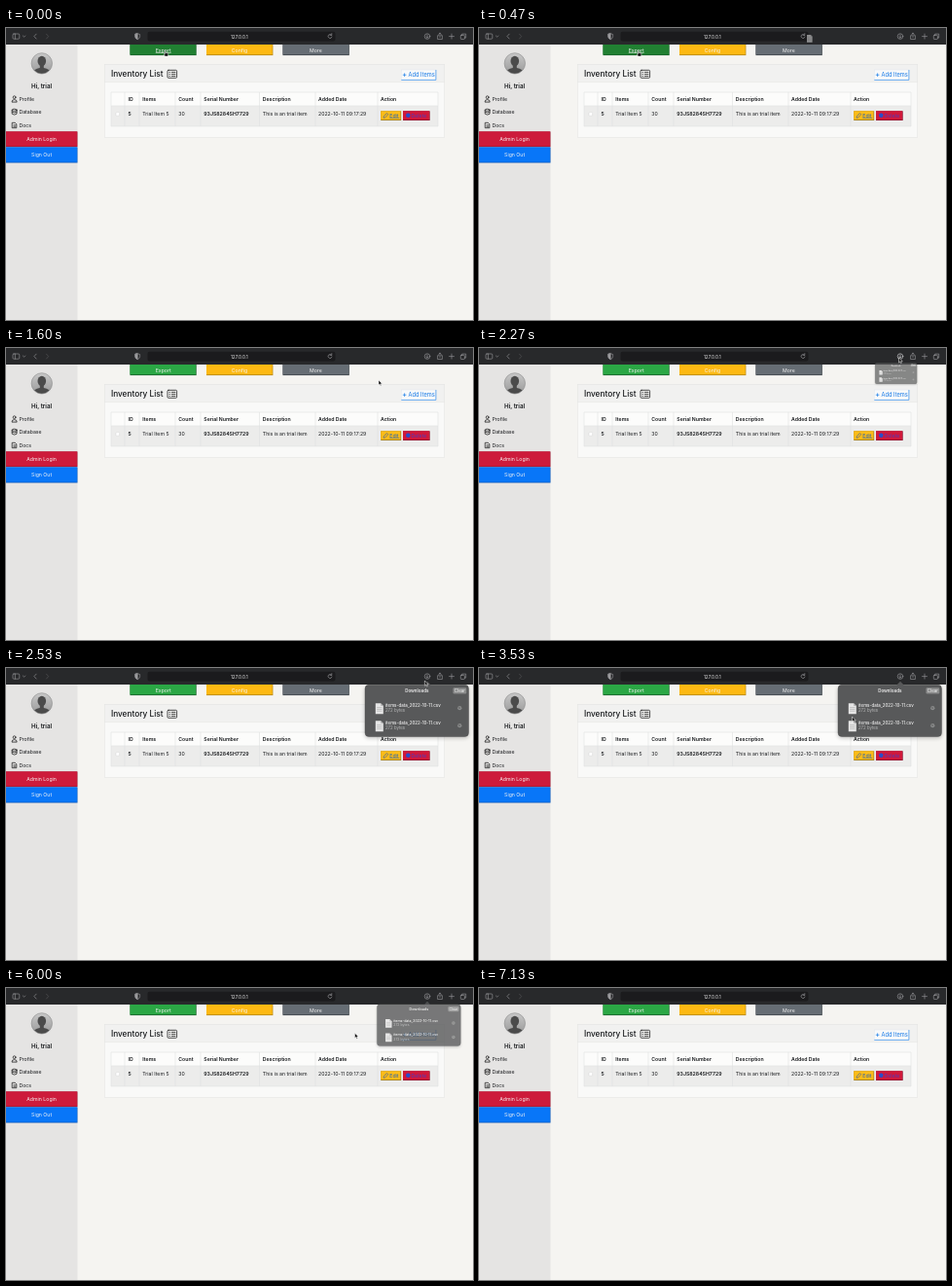
These frames come from a looping animation (480 by 300 pixels, 7190 ms). An HTML page:

```html
<!DOCTYPE html>
<html lang="en">
<head>
<meta charset="utf-8">
<title>Inventory List</title>
<style>
  html, body { margin: 0; width: 100%; height: 100%; overflow: hidden; background: #f5f4f1; }
  svg { display: block; width: 480px; height: 300px; }
  text { font: 5.2px Inter, "Open Sans", sans-serif; fill: #17191c; }
  .b { font-weight: 600; }
  .mid { text-anchor: middle; }
  .light { fill: #f4f4f4; }
  .ico { fill: none; stroke: #222; stroke-width: .8; stroke-linecap: round; stroke-linejoin: round; }
  .bar { fill: none; stroke: #9c9c9f; stroke-width: .6; stroke-linecap: round; stroke-linejoin: round; }
  .grid { fill: none; stroke: #e0e1e1; stroke-width: .6; }
</style>
</head>
<body>
<svg viewBox="0 0 480 300" xmlns="http://www.w3.org/2000/svg">
  <defs>
    <linearGradient id="grey" x2="0" y2="1">
      <stop stop-color="#c9c9c9"/><stop offset="1" stop-color="#999"/>
    </linearGradient>
    <clipPath id="round"><circle cx="36.8" cy="36.4" r="10.3"/></clipPath>
    <filter id="soft" x="-20%" y="-20%" width="140%" height="150%"><feGaussianBlur stdDeviation="2"/></filter>
    <g id="doc">
      <path d="M0 0H5.3L8 2.8V11H0Z" fill="#e6e6e6"/>
      <path d="M5.3 0V2.8H8Z" fill="#b5b5b5"/>
      <path d="M1.4 4.4H6.6M1.4 6.2H6.6M1.4 8H6.6" stroke="#aaa" stroke-width=".6"/>
    </g>
  </defs>

  <rect width="480" height="300" fill="#f5f4f1"/>
  <rect width="73.5" height="300" fill="#e5e4e3"/>

  <!-- sidebar -->
  <circle cx="36.8" cy="36.4" r="10.7" fill="url(#grey)" stroke="#8c8c8c" stroke-width=".6"/>
  <g clip-path="url(#round)" fill="#4b4b4b">
    <ellipse cx="36.8" cy="34" rx="4.3" ry="5.3"/>
    <path d="M34.8 37H38.8V41Q46 42 46.5 48H27Q27.6 42 34.8 41Z"/>
  </g>
  <text class="b mid" x="36.6" y="61.8" style="font-size:6.2px">Hi, trial</text>
  <g class="ico">
    <circle cx="8.6" cy="71.2" r="1.4"/>
    <path d="M6 75.7Q6 73.6 8.6 73.6T11.2 75.7Z"/>
    <ellipse cx="8.6" cy="84.2" rx="2.4" ry="1"/>
    <path d="M6.2 84.2V88.2Q8.6 90 11 88.2V84.2M6.2 86.2Q8.6 88 11 86.2"/>
    <path d="M6.6 97.3H9.3L10.8 98.8V102.7H6.6ZM7.9 99.8H9.5M7.9 101.3H9.5"/>
  </g>
  <text x="13.4" y="74.8">Profile</text>
  <text x="13.4" y="88.2">Database</text>
  <text x="13.4" y="102">Docs</text>
  <rect y="106.4" width="73.5" height="15.8" fill="#9f1730"/>
  <rect y="106.4" width="72.9" height="15" fill="#cd1b3b"/>
  <rect y="122.5" width="73.5" height="16" fill="#0759bd"/>
  <rect y="122.5" width="72.9" height="15.2" fill="#0876f8"/>
  <text class="mid light" x="36.6" y="116.1">Admin Login</text>
  <text class="mid light" x="36.6" y="132.4">Sign Out</text>

  <!-- top buttons -->
  <rect x="127.5" y="15" width="68.2" height="13.1" fill="#186429"/>
  <rect id="export" x="127.5" y="15" width="67.5" height="12.2"/>
  <rect x="206" y="15" width="68.4" height="13.1" fill="#b88912"/>
  <rect x="206" y="15" width="67.7" height="12.2" fill="#fdb913"/>
  <rect x="284.5" y="15" width="68.3" height="13.1" fill="#41474d"/>
  <rect x="284.5" y="15" width="67.6" height="12.2" fill="#666d74"/>
  <text class="mid light" x="161.7" y="24.6">Export</text>
  <path id="exportLine" d="M153.8 25.5H169.6" stroke="#f4f4f4" stroke-width=".5"/>
  <text class="mid light" x="240" y="24.6">Config</text>
  <text class="mid light" x="318.4" y="24.6">More</text>

  <!-- card -->
  <rect x="101.3" y="37.3" width="349.4" height="75" fill="#f9f9f8" stroke="#e6e6e5" stroke-width=".6"/>
  <rect x="101.3" y="37.3" width="349.4" height="18.5" fill="#f1f1f0" stroke="#e6e6e5" stroke-width=".6"/>
  <text x="107.9" y="49.7" style="font-size:8.3px;font-weight:500">Inventory List</text>
  <g class="ico">
    <rect x="166" y="43.3" width="9.6" height="8" rx="1"/>
    <path d="M170.3 45.4H174M170.3 47.4H174M170.3 49.4H174M168 45.4H168.5M168 47.4H168.5M168 49.4H168.5"/>
  </g>
  <rect x="406.3" y="43" width="35.6" height="10.4" fill="#f8f9fa" stroke="#dce3ea" stroke-width=".4"/>
  <path d="M406.3 53.4H441.9V43" fill="none" stroke="#4a9bf0" stroke-width=".8"/>
  <path d="M407.8 48.2H411.4M409.6 46.4V50" stroke="#1479e6" stroke-width=".7"/>
  <text x="413.6" y="50.1" style="font-size:5.7px;fill:#1479e6">Add Items</text>

  <rect x="108" y="66" width="336" height="14" fill="#fcfcfb"/>
  <rect x="108" y="80" width="336" height="21" fill="#ececeb"/>
  <path class="grid" d="M108 66H444V101H108ZM108 80H444M122 66V101M137 66V101M174 66V101M200 66V101M260.5 66V101M318 66V101M382 66V101"/>
  <rect x="113" y="86.6" width="3.6" height="3.6" rx=".7" fill="#fff" stroke="#ccc" stroke-width=".4"/>
  <g id="cells"></g>

  <rect x="385.2" y="85.3" width="21" height="9.7" fill="#9a7b25"/>
  <rect x="385.2" y="85.3" width="20.3" height="8.9" fill="#fbbb18"/>
  <path d="M388 92.3L388.4 90.6L391.5 87.5L392.8 88.8L389.7 91.9Z" fill="none" stroke="#47669a" stroke-width=".7"/>
  <text x="394.3" y="91.7" style="fill:#1f62b8">Edit</text>
  <path id="editLine" d="M394.3 92.6H404.3" stroke="#1f62b8" stroke-width=".5"/>
  <rect x="408" y="85.3" width="27.7" height="9.7" fill="#8d1631"/>
  <rect x="408" y="85.3" width="27" height="8.9" fill="#cf183b"/>
  <circle cx="413.3" cy="89.8" r="2.3" fill="#274dca"/>
  <text x="416.6" y="91.7" style="fill:#513bbb">Delete</text>

  <!-- browser bar -->
  <rect width="480" height="17" fill="#28292b"/>
  <rect x="145.5" y="3.8" width="193" height="9.8" rx="2" fill="#1b1b1d"/>
  <text class="mid" x="239.8" y="10.5" style="fill:#eee;font-size:4.7px">127.0.0.1</text>
  <g class="bar">
    <rect x="7" y="6" width="6.8" height="5.2" rx="1"/>
    <path d="M9.4 6V11.2M17.4 8L18.6 9.2L19.8 8M31.1 6.2L28.9 8.6L31.1 11"/>
    <path d="M41.5 6.2L43.7 8.6L41.5 11" stroke="#5a5a5c"/>
    <path d="M135.2 5.8L137.6 6.5V8.7Q137.6 10.8 135.2 11.7Q132.8 10.8 132.8 8.7V6.5Z"/>
    <path d="M135.2 5.8V11.7Q132.8 10.8 132.8 8.7V6.5Z" fill="#9c9c9f"/>
    <path d="M334.6 7.2A2 2 0 1 0 335 9M334.8 5.6V7.4H333"/>
    <g id="load">
      <circle cx="433" cy="8.6" r="2.8"/>
      <path d="M433 7V10M431.8 9L433 10.2L434.2 9"/>
    </g>
    <path d="M444.8 7.7H443.6V11.5H448.4V7.7H447.2M446 9.6V5.2M444.8 6.3L446 5.1L447.2 6.3"/>
    <path d="M458 6.1V11.1M455.5 8.6H460.5M468.7 7.4V6.1H472.7V10.1H471.4"/>
    <rect x="467.3" y="7.4" width="4.1" height="4.1" rx=".7"/>
  </g>

  <!-- downloads list -->
  <g id="pop">
    <rect x="369" y="19" width="106.5" height="53" rx="4" fill="#000" opacity=".25" filter="url(#soft)"/>
    <path d="M373 17.3H429.5L433 13.8L436.5 17.3H471.5Q475.5 17.3 475.5 21.3V66.5Q475.5 70.5 471.5 70.5H373Q369 70.5 369 66.5V21.3Q369 17.3 373 17.3Z" fill="#58595a" stroke="#474848" stroke-width=".4"/>
    <text class="mid b" x="422.3" y="25.2" style="fill:#eee;font-size:4.5px">Downloads</text>
    <rect x="459.5" y="20.3" width="13.8" height="6.3" rx="1.3" fill="#8b8c8c"/>
    <text class="mid" x="466.4" y="25.1" style="fill:#f2f2f2;font-size:4.5px">Clear</text>
    <g id="files"></g>
  </g>

  <use id="fly" href="#doc"/>
  <g id="cursor" stroke="#fff" stroke-width=".5" stroke-linejoin="round" fill="#111">
    <path id="arrow" d="M0 0V5.2L1.2 4.1L2 5.9L2.9 5.5L2.1 3.8H3.7Z"/>
    <path id="hand" d="M-.5 0Q0 -.7 .5 0V2L2.6 2.5Q3.2 2.8 3 3.6L2.6 5.6H-.4L-1.7 3.5Q-1.4 2.7 -.5 3.4Z"/>
  </g>
</svg>
<script>
const LOOP = 7190;
const el = id => document.getElementById(id);
const label = (x, y, s, cls = '', style = '') =>
  `<text x="${x}" y="${y}" class="${cls}" style="${style}">${s}</text>`;

// x, heading, value, bold value
const columns = [
  [125.5, 'ID', '5', true],
  [140.3, 'Items', 'Trial Item 5'],
  [177.3, 'Count', '30'],
  [203.3, 'Serial Number', '93JS8284SH7729', true],
  [263.8, 'Description', 'This is an trial item'],
  [321, 'Added Date', '2022-10-11 09:17:29'],
  [385, 'Action', '']
];
el('cells').innerHTML = columns.map(([x, head, value, bold]) =>
  label(x, 75.2, head, 'b') + label(x, 90.3, value, bold ? 'b' : '')).join('');

el('files').innerHTML = [36.2, 54.2].map(y => `
  <use href="#doc" x="379.8" y="${y}"/>
  ${label(390, y + 3.6, 'items-data_2022-10-11.csv', '', 'fill:#f0f0f0;font-size:4.4px;font-weight:500')}
  ${label(390, y + 9, '272 bytes', '', 'fill:#b9baba;font-size:4.3px')}
  <circle cx="466.3" cy="${y + 5}" r="2.1" fill="#8b8c8c"/>
  <circle cx="466" cy="${y + 4.7}" r=".8" fill="none" stroke="#555" stroke-width=".4"/>
  <path d="M466.6 ${y + 5.3}l.7 .7" stroke="#555" stroke-width=".4"/>`).join('');

// time followed by values
const path = [
  [0, 163.8, 23.5], [730, 164, 23.5], [930, 164, 23.5], [1000, 171.8, 23.8],
  [1200, 366, 41], [1400, 366, 41], [2000, 431.5, 9.8], [2400, 431.5, 9.8],
  [2930, 424, 31], [3270, 404, 62], [3530, 383.5, 50], [3730, 383.5, 50],
  [4400, 408, 37], [4700, 408, 37], [5200, 359.3, 46], [5270, 358.5, 46.3]
];
const popKeys = [
  [2270, .405, .7], [2330, .8, .9], [2400, 1.03, 1], [2470, 1, 1],
  [5930, 1, 1], [6000, .807, .8], [6070, .45, .35], [6130, .4, 0]
];

function at(keys, t) {
  const i = keys.findIndex(k => k[0] > t);
  if (i < 0) return keys[keys.length - 1].slice(1);
  if (i === 0) return keys[0].slice(1);
  const a = keys[i - 1], b = keys[i];
  const u = (t - a[0]) / (b[0] - a[0]);
  const e = b[0] - a[0] > 150 ? u * u * (3 - 2 * u) : u;
  return a.slice(1).map((v, j) => v + (b[j + 1] - v) * e);
}

const show = (id, on) => el(id).setAttribute('visibility', on ? 'visible' : 'hidden');

function draw(ms) {
  const step = Math.floor((ms + 5) * .015);
  const t = Math.round(step * 20 / 3) * 10;

  const hover = t < 1070;
  el('export').setAttribute('fill', hover ? '#218032' : '#2ba745');
  show('exportLine', hover);
  show('editLine', t < 3730);

  const [x, y] = at(path, t);
  el('cursor').setAttribute('transform', `translate(${x} ${y})`);
  show('hand', hover);
  show('arrow', !hover && t < 7130);

  const flying = t >= 70 && t < 800;
  show('fly', flying);
  if (flying) {
    const u = (t - 70) / 660;
    const e = u * u * (3 - 2 * u);
    const fx = 161 + 268 * e;
    const fy = 18 - 14 * e - 8 * u * (1 - u);
    el('fly').setAttribute('transform', `translate(${fx} ${fy}) scale(${.9 - .3 * e})`);
    el('fly').setAttribute('opacity', .75 - .35 * u);
  }

  el('load').setAttribute('stroke', t >= 2130 && t < 2400 ? '#dededf' : '#9c9c9f');

  const open = t >= 2270 && t < 6130;
  show('pop', open);
  if (open) {
    const [s, alpha] = at(popKeys, t);
    el('pop').setAttribute('transform', `translate(433 14) scale(${s}) translate(-433 -14)`);
    el('pop').setAttribute('opacity', alpha);
  }
}

const start = performance.now();
function tick() {
  draw((performance.now() - start) % LOOP);
  requestAnimationFrame(tick);
}
draw(0);
requestAnimationFrame(tick);
</script>
</body>
</html>
```
